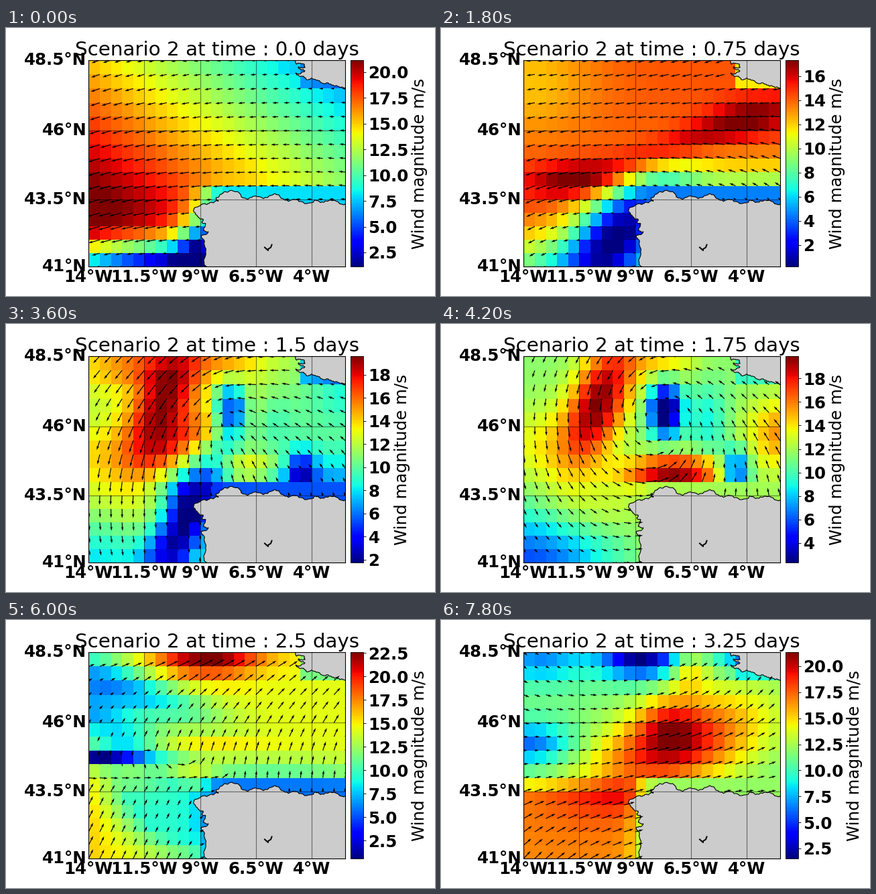
Recreate the animation shown at these times as a matplotlib script. Size 640 px wide and 400 px high, loop 8000 ms.

```python
import numpy as np
import matplotlib.pyplot as plt
from matplotlib.animation import FuncAnimation
from matplotlib.ticker import MaxNLocator

W, H, DPI = 640, 400, 80
TOP, BOTTOM = 48, 356
STEP_FRAMES = 3  # a new wind field every 600 ms

# grid nodes: columns from the west, rows counted down from the top cell
C, R = np.meshgrid(np.arange(24), 14 - np.arange(16))
X, Y = C / 11 - 1, R / 7 - 1

plt.rcParams.update({"font.size": 22, "font.weight": "bold",
                     "font.family": "DejaVu Sans"})


# ---- Miller projection into stage pixels ----
def miller(lat):
    return 1.25 * np.log(np.tan(np.pi / 4 + 0.4 * np.radians(lat)))


SCALE = (BOTTOM - TOP) / (miller(48.5) - miller(41))
WIDTH = SCALE * np.radians(11.5)
LEFT = 328 - WIDTH * 1.07 / 2
RIGHT = LEFT + WIDTH


def px(lon):
    return LEFT + SCALE * np.radians(np.asarray(lon) + 14)


def py(lat):
    return BOTTOM - SCALE * (miller(lat) - miller(41))


# ---- wind model: smooth highs and lows, sheltered coasts, swirls ----
def ramp(x):
    return 1 / (1 + np.exp(-x))


def blob(col, row, amp, long, short, tilt=0):
    """Gaussian high or low, its long axis raised by tilt degrees."""
    a, dx, dy = np.radians(tilt), C - col, R - row
    u = dx * np.cos(a) - dy * np.sin(a)
    v = dx * np.sin(a) + dy * np.cos(a)
    return amp * np.exp(-(u / long) ** 2 - (v / short) ** 2)


def southwest(row):
    return ramp(1.5 * (10.3 - C)) * ramp(5 * (R - row))


NORTH_COAST = ramp(2 * (C - 10)) * ramp(6 * (R - 8.5))
BAY = (C > 18) & (R < 2)


def speed_field(base, coast, *parts):
    """Wind strength in percent of the colour range."""
    level = base + sum(parts)
    level = level + (coast - level) * NORTH_COAST
    return np.clip(np.where(BAY, 0.8 * level, level), 0, 100)


def heading(mean, east, south, mix, eye=None, sector=None):
    """Unit wind vectors: a bilinear angle, a swirl, a turned sector."""
    angle = np.radians(mean + east * X + south * Y + mix * X * Y)
    if eye:
        angle = angle + np.arctan2(eye[1] - R, C - eye[0]) + np.pi / 2
    flow = np.exp(1j * angle)
    if sector:
        row, turned = sector
        w = southwest(row)
        flow = flow * (1 - w) + np.exp(1j * np.radians(turned)) * w
    return flow


speeds = {
    0: speed_field(
        70 + 3.6 * R - 2.05 * C, 33,
        blob(8, 14.8, -112, 20, 2.3),
        blob(10.5, 12.5, -60, 2.5, 2.5)),
    3: speed_field(
        82, 24,
        blob(0, 1, -12, 6, 4),
        blob(4.5, 8, 18, 5, 1.3),
        blob(13, 5.7, 18, 10, 1.3, 16),
        blob(20, 3.5, 10, 4, 1.5),
        blob(22, 9.5, -35, 11, 2.5),
        blob(7.7, 12.7, -85, 6.5, 3.2, 38),
        blob(0, 15, -28, 4, 3)),
    5: speed_field(
        78, 26,
        blob(3.5, 0.3, 20, 4, 1.3),
        blob(0, 4, -9, 3, 2),
        blob(9, 5.2, 24, 5, 1.6, 22),
        blob(24, 5, -45, 6, 6),
        blob(14, 9, -55, 7, 2),
        blob(8.3, 11.3, -72, 6, 2.2, 59)),
    7: speed_field(
        50, 53,
        blob(6.3, 2.7, 46, 5, 2.4, 61),
        blob(12, 0, 15, 3, 1.2),
        blob(12.2, 3.3, -62, 1.4, 1.8),
        blob(13, 7.8, 48, 4.5, 1.2),
        blob(18.5, 7.7, -42, 1.3, 1.5),
        blob(16, 4, -14, 1.8, 2.5),
        blob(23, 5, 24, 3.5, 2.5),
        blob(1, 6, 12, 4, 3),
        blob(6, 10.5, 10, 5, 2),
        blob(0, 15, -32, 7, 4.5)),
    9: speed_field(
        73, 22,
        blob(9.5, -0.2, 30, 4, 1.6),
        blob(-1, 2, -20, 4, 4),
        blob(4, 8.5, -74, 9, 3.2, -38),
        blob(17, 10.5, -58, 9, 2.6),
        blob(4, 14, -28, 9, 5)),
    11: speed_field(
        46, 30,
        34 * southwest(7.5),
        blob(11, -0.3, 40, 5, 1.4),
        blob(4, 2.3, -46, 7, 1.5, -15),
        blob(0, 5.7, 32, 2.2, 0.9),
        blob(9, 6, 14, 8, 0.7),
        blob(0, 7, -60, 3.5, 0.55),
        blob(3, 8, 22, 3.5, 1.5)),
    13: speed_field(
        50, 54,
        27 * southwest(9),
        blob(10, -0.3, -50, 3.5, 1.6),
        blob(1, 0, -22, 4, 1.6),
        blob(14.3, 0.8, 18, 1.8, 1.5),
        blob(19, 0, -20, 2.5, 1),
        blob(0, 6, -26, 4, 1.5),
        blob(13, 6.3, 42, 8, 3.2, 15),
        blob(12.5, 4.7, 17, 2.5, 2)),
}

headings = {
    0: heading(186, -12, -3, -1),
    3: heading(178, -23, -13, -27),
    5: heading(189, -51, -17, -45),
    7: heading(18, 22, 0, 0, eye=(12, 3.5)),
    9: heading(357, 28, -7, 0, sector=(8.5, 108)),
    11: heading(162, -33, 110, -20, sector=(7.5, 20)),
    13: heading(13, 7, 1, -40),
}

# colour range in m/s at chosen steps
RANGE_STEPS = [0, 3, 5, 7, 8, 9, 10, 11, 13]
LOW = [1.13, 0.22, 1.14, 2.34, 1.2, 0.4, 0.6, 0.72, 1.53]
HIGH = [21.17, 17.33, 19.33, 19.9, 23.9, 25.74, 22.6, 21.06, 21.35]


def wind(step):
    """Speed, unit heading and colour range for one time step."""
    a = max(k for k in speeds if k <= step)
    b = min(k for k in speeds if k >= step)
    t = (step - a) / (b - a) if b > a else 0
    level = speeds[a] * (1 - t) + speeds[b] * t
    level = (level - level.min()) / (level.max() - level.min())
    turn = headings[a] * (1 - t) + headings[b] * t
    low = np.interp(step, RANGE_STEPS, LOW)
    high = np.interp(step, RANGE_STEPS, HIGH)
    return low + (high - low) * level, turn / (abs(turn) + 1e-9), low, high


# ---- coastlines: a few capes and bays, roughened between ----
rng = np.random.default_rng(4)


def rough(points, levels=3):
    p = np.array(points, float)
    for _ in range(levels):
        d = np.diff(p, axis=0)
        shift = rng.uniform(-0.24, 0.24, (len(d), 1))
        mid = (p[1:] + p[:-1]) / 2 + shift * d[:, ::-1] * [1, -1]
        p = np.insert(p, np.arange(1, len(p)), mid, axis=0)
    return p


spain = rough([
    (301, 357), (298, 335), (295, 316), (292, 309), (302, 304), (294, 302),
    (298, 292), (292, 290), (294, 285), (286, 282), (281, 275), (282, 268),
    (297, 262), (309, 261), (317, 258), (313, 254), (322, 248), (331, 245),
    (351, 252), (366, 253), (390, 253), (395, 250), (416, 257), (437, 259),
    (460, 257), (473, 260), (484, 257), (507, 262)])
brittany = rough([
    (429, 47), (433, 54), (445, 54), (446, 59), (436, 58), (446, 64),
    (432, 67), (444, 72), (448, 77), (463, 78), (474, 83), (490, 87),
    (498, 89), (507, 91)])
lands = [np.vstack([spain, [(507, 357)]]), np.vstack([brittany, [(507, 47)]])]

# ---- stage ----
fig = plt.figure(figsize=(W / DPI, H / DPI), dpi=DPI, facecolor="white")


def stage_axes(x0, x1):
    return fig.add_axes([x0 / W, 1 - BOTTOM / H, (x1 - x0) / W,
                         (BOTTOM - TOP) / H])


ax = stage_axes(LEFT, RIGHT)
cax = stage_axes(RIGHT + 0.02 * WIDTH, RIGHT + 0.07 * WIDTH)

gx, gy = px(-14 + 0.5 * C), py(48 - 0.5 * R)
mesh = ax.pcolormesh(gx, gy, np.zeros((15, 23)), cmap="jet", vmin=0, vmax=1)

sea = np.ones(gx.shape, bool)
for land in lands:
    patch = plt.Polygon(land, fc="#cccccc", ec="black", lw=1, zorder=2)
    ax.add_patch(patch)
    inside = patch.get_path().contains_points(np.c_[gx.ravel(), gy.ravel()])
    sea &= ~inside.reshape(gx.shape)
ax.plot([386, 391, 391, 395, 396.5], [327.5, 332, 330, 327.5, 323.5],
        color="black", lw=1.8, zorder=2.1)

arrows = ax.quiver(gx[sea], gy[sea], np.ones(sea.sum()), np.zeros(sea.sum()),
                   width=0.06 / np.sqrt(sea.size), scale=1, zorder=3)

GRID = dict(color="black", lw=1, dashes=(1, 1), zorder=2.5)
for i in range(4):
    lat = 41 + 2.5 * i
    ax.axhline(py(lat), **GRID)
    ax.text(LEFT - 3.06, py(lat), f"{lat:g}°N", ha="right", va="center")
for i in range(5):
    lon = 14 - 2.5 * i
    ax.axvline(px(-lon), **GRID)
    ax.text(px(-lon), BOTTOM + 3.83, f"{lon:g}°W", ha="center", va="top")

ax.set(xlim=(LEFT, RIGHT), ylim=(BOTTOM, TOP), xticks=[], yticks=[])
for spine in ax.spines.values():
    spine.set_linewidth(1)
title = ax.set_title("")

bar = fig.colorbar(mesh, cax=cax,
                   ticks=MaxNLocator(9, steps=[1, 2, 2.5, 5, 10]))
bar.set_label("Wind magnitude m/s")


def draw(frame):
    step = frame // STEP_FRAMES
    speed, turn, low, high = wind(step)
    mesh.set_array(speed[:15, :23])
    mesh.set_clim(low, high)
    flow = (speed * turn)[sea]
    arrows.set_UVC(flow.real, flow.imag)
    arrows.scale = 1.8 * speed[sea].mean() * np.sqrt(sea.sum())
    title.set_text(f"Scenario 2 at time : {step * 0.25} days")
    return mesh, arrows, title


anim = FuncAnimation(fig, draw, frames=40, interval=200, repeat=True,
                     repeat_delay=0, blit=False)
plt.show()
```
